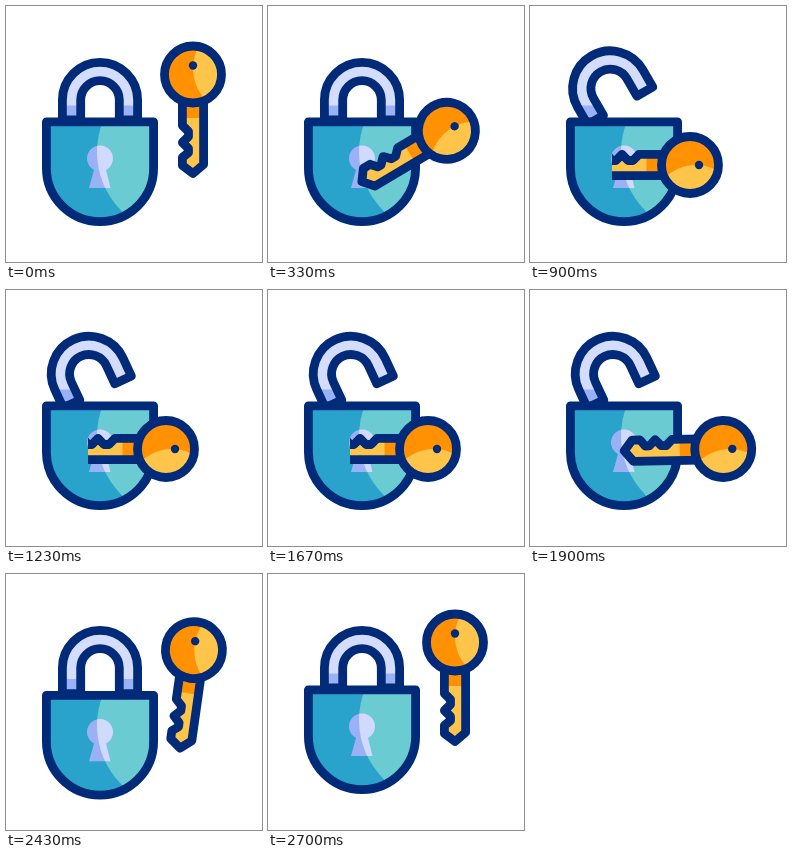
An HTML page that plays this animation: 256 px wide and 256 px high, repeating every 2900 ms.

```html
<!DOCTYPE html>
<html lang="en">
<head>
<meta charset="utf-8">
<title>Padlock and key</title>
<style>
  html, body { margin: 0; width: 100%; height: 100%; overflow: hidden; background: #fff; }
  svg { display: block; width: 100%; height: 100%; }
  .line { fill: none; stroke: #012a78; stroke-width: 8.8; stroke-linejoin: round; }
</style>
</head>
<body>
<svg viewBox="0 0 256 256">
  <defs>
    <path id="arch"/>
    <path id="body" d="M40.400 115.800H147.600V162a53.600 53.600 0 0 1-107.200 0Z"/>
    <path id="hole" d="M88 164a13 13 0 1 1 12 0L104.500 182H83Z"/>
    <path id="blade" d="M-10.600 24V51L-4.500 57V62L-10.600 68L-4.500 74V78L-10.600 83V91L0 99L10.600 90V24Z"/>
    <circle id="bow" r="28.500"/>
    <clipPath id="inArch"><use id="archClip" href="#arch"/></clipPath>
    <clipPath id="inBody"><use href="#body"/></clipPath>
    <clipPath id="inHole"><use href="#hole"/></clipPath>
    <clipPath id="inBlade"><use href="#blade"/></clipPath>
    <clipPath id="inBow"><use href="#bow"/></clipPath>
    <clipPath id="slot"><path d="M82 0H256V256H82Z"/></clipPath>
  </defs>

  <g clip-path="url(#inArch)">
    <path fill="#d5ddff" d="M0 0H256V256H0Z"/>
    <path id="shade" fill="#9bb1f6" d="M0 99.500H256V140H0Z"/>
  </g>
  <use id="archLine" class="line" href="#arch"/>

  <g id="lock">
    <g clip-path="url(#inBody)">
      <path fill="#29a2cc" d="M36 110H153V222H36Z"/>
      <circle cx="174" cy="146" r="83" fill="#6accd2"/>
    </g>
    <g clip-path="url(#inHole)">
      <path fill="#9bb1f6" d="M80 138H108V184H80Z"/>
      <circle cx="174" cy="146" r="83" fill="#d0daff"/>
    </g>
    <use class="line" href="#body"/>
  </g>

  <g clip-path="url(#slot)">
    <g id="key">
      <g clip-path="url(#inBlade)">
        <path fill="#ffc54b" d="M-16 24H16V104H-16Z"/>
        <path fill="#ff9102" d="M-16 24H16V43.500H-16Z"/>
      </g>
      <use class="line" href="#blade"/>
      <g clip-path="url(#inBow)">
        <path fill="#ff9102" d="M-30-30H30V30H-30Z"/>
        <circle cx="45" cy="-6" r="45" fill="#ffc54b"/>
      </g>
      <use class="line" href="#bow"/>
      <circle cy="-9" r="4.200" fill="#012a78"/>
    </g>
  </g>
</svg>
<script>
  const LOOP = 2900;
  const $ = id => document.getElementById(id);
  const place = (id, transform) => $(id).setAttribute('transform', transform);

  // Eased progress from 0 to 1 between two times
  function ease(t, from, to) {
    const u = Math.min(1, Math.max(0, (t - from) / (to - from)));
    return (1 - Math.cos(Math.PI * u)) / 2;
  }

  function drawKey(t) {
    const reach = ease(t, 30, 550), push = ease(t, 430, 680);
    const pull = ease(t, 1670, 1970), lift = ease(t, 2000, 2530);
    const x = 187 - 13 * reach - 14 * push + 38 * pull - 11 * lift;
    const y = 68.5 + 90.5 * (reach - lift);
    const angle = 90 * (ease(t, 30, 530) - ease(t, 1850, 2570));
    place('key', `translate(${x} ${y}) rotate(${angle})`);
  }

  function drawLock(t) {
    // Swings open past its rest, then snaps shut and knocks the body down
    const angle = -30 * ease(t, 640, 890) + 5 * ease(t, 890, 1070) + 25 * ease(t, 2170, 2400);
    const dip = 7 * (ease(t, 2340, 2470) - ease(t, 2470, 2650));
    const foot = 114 + dip;
    $('arch').setAttribute('d',
      `M56.400 ${foot}V94a37.600 37.600 0 0 1 75.200 0V${foot}H113.300V94a19.300 19.300 0 0 0-38.600 0V${foot}Z`);
    const swing = `rotate(${angle} 65.5 114)`;
    place('archClip', swing);
    place('archLine', swing);
    place('lock', `translate(0 ${dip})`);
    place('shade', `translate(0 ${dip})`);
  }

  const start = performance.now();
  function tick() {
    const t = (performance.now() - start) % LOOP;
    drawKey(t);
    drawLock(t);
    requestAnimationFrame(tick);
  }
  tick();
</script>
</body>
</html>
```
